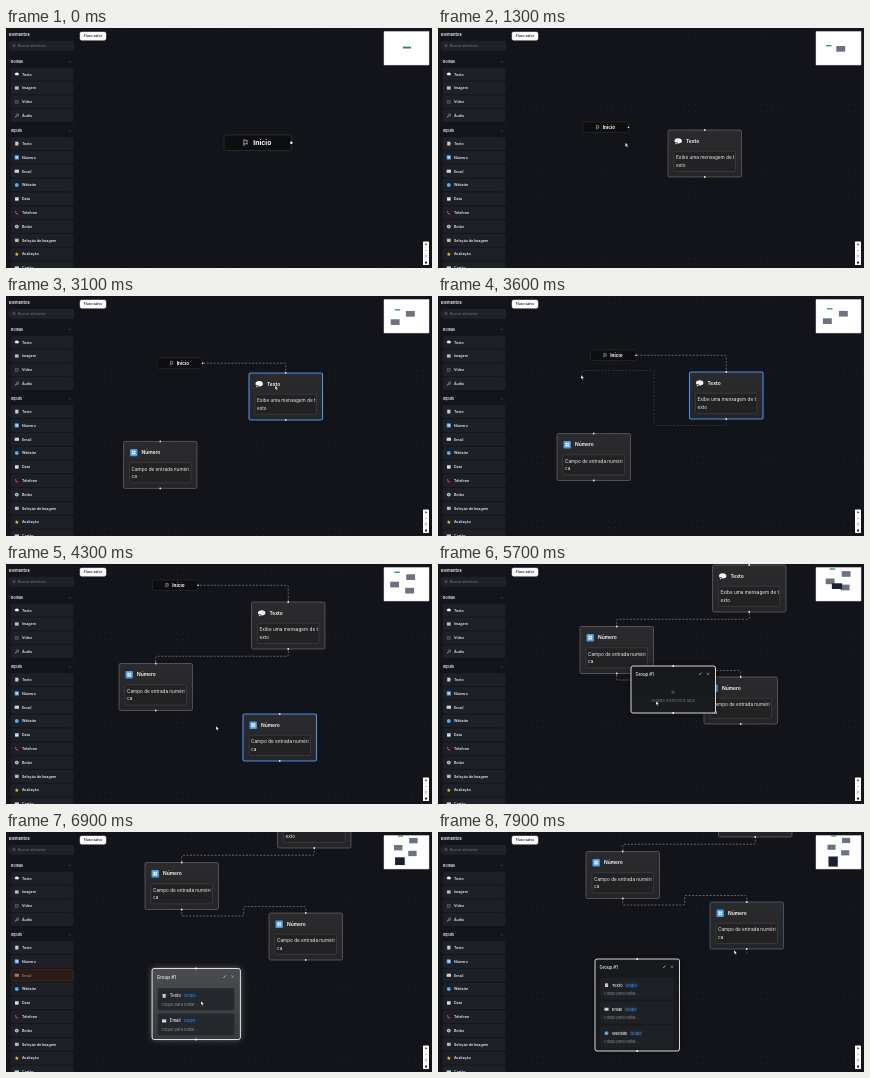
Animation, 426 px wide and 240 px high, one loop 8 s. Source, as an HTML page with a canvas:

```html
<!DOCTYPE html>
<html lang="pt">
<head>
<meta charset="utf-8">
<title>Editor de fluxo</title>
<style>
html, body { margin: 0; width: 100%; height: 100%; overflow: hidden; background: #131419; }
canvas { display: block; width: 426px; height: 240px; }
</style>
</head>
<body>
<canvas id="stage"></canvas>
<script>
const W = 426, H = 240, LOOP = 8000;
const canvas = document.getElementById('stage');
const c = canvas.getContext('2d');
const dpr = window.devicePixelRatio || 1;
canvas.width = W * dpr;
canvas.height = H * dpr;

const FONT = 'Inter, "Open Sans", sans-serif';
const CARD = { w: 73.5, h: 47 };
const START = { w: 45.5, h: 10.5 };

// Each key is [time, ...values]
const viewKeys = [[200, 218, 107, 1.48], [800, 145, 94, 1], [2600, 145, 94, 1], [3300, 152.5, 54, 1],
  [3700, 152.5, 54, 1], [4000, 146.5, 16, 1], [4900, 146.5, 16, 1], [5400, 175.5, -21, 1],
  [5800, 175.5, -21, 1], [6300, 172.5, -53, 1], [7000, 172.5, -53, 1], [7600, 181.5, -64, 1]];
const textKeys = [[2950, 85, 8], [3250, 99, 22]];
const numKeys = [[2650, 18.5, 69], [2950, -33.5, 83.5]];
const groupKeys = [[5750, 17.5, 123], [6200, -24.5, 191]];
const cursorKeys = [[0, 284, 115], [500, 120, 70], [800, 12, 46], [1200, 250, 112], [1500, 12, 130],
  [1800, 185, 173], [2000, 190, 99], [2300, 231, 91], [2600, 266, 102], [2650, 200, 173], [2950, 148, 160],
  [3000, 262, 95], [3250, 285, 85], [3350, 288, 123], [3600, 144, 81], [3800, 152, 118], [3950, 12, 130],
  [4200, 262, 160], [4300, 211, 164], [4400, 149, 146], [4700, 273, 150], [5000, 30, 234], [5300, 215, 125],
  [5700, 219, 139], [5800, 219, 139], [6200, 177, 176], [6300, 20, 116], [6500, 190, 170], [6600, 20, 143],
  [6850, 196, 168], [6900, 196, 171], [7100, 20, 157], [7400, 199, 185], [7750, 309, 118], [7900, 297, 120]];

// start, end, sidebar row
const drags = [[800, 1200, 0], [1500, 1800, 5], [3950, 4200, 5], [6300, 6500, 4], [6600, 6850, 6], [7100, 7400, 7]];

const rows = [['Texto', 'chat'], ['Imagem', 'image'], ['Vídeo', 'video'], ['Áudio', 'audio'],
  ['Texto', 'memo'], ['Número', 'number'], ['Email', 'mail'], ['Website', 'globe'], ['Data', 'date'],
  ['Telefone', 'phone'], ['Botão', 'button'], ['Seleção de Imagem', 'image'], ['Avaliação', 'star'], ['Cartão', 'mail']];
const rowY = i => i < 4 ? 46.2 + i * 13.8 : 115.6 + (i - 4) * 13.82;

function track(keys, t) {
  let i = keys.findIndex(k => k[0] > t);
  if (i === 0) return keys[0].slice(1);
  if (i < 0) return keys[keys.length - 1].slice(1);
  const a = keys[i - 1], b = keys[i];
  let p = (t - a[0]) / (b[0] - a[0]);
  p = p * p * (3 - 2 * p);
  return a.slice(1).map((v, j) => v + (b[j + 1] - v) * p);
}

function box(x, y, w, h, r, fill, stroke, line = 0.6) {
  c.beginPath();
  c.roundRect(x, y, w, h, r);
  if (fill) { c.fillStyle = fill; c.fill(); }
  if (stroke) { c.strokeStyle = stroke; c.lineWidth = line; c.stroke(); }
}

function text(str, x, y, size, color = '#f2f2f4', weight = 400, align = 'left') {
  c.font = `${weight} ${size}px ${FONT}`;
  c.textAlign = align;
  c.fillStyle = color;
  c.fillText(str, x, y);
  return c.measureText(str).width;
}

function dot(x, y, r, color) {
  c.beginPath();
  c.arc(x, y, r, 0, 7);
  c.fillStyle = color;
  c.fill();
}

function line(points, color, width = 0.6) {
  c.beginPath();
  points.forEach(([x, y], i) => i ? c.lineTo(x, y) : c.moveTo(x, y));
  c.strokeStyle = color;
  c.lineWidth = width;
  c.stroke();
}

// Icons are drawn around their centre
function icon(kind, x, y, s) {
  c.save();
  c.translate(x, y);
  c.scale(s, s);
  const r = (a, b, w, h, col) => { c.fillStyle = col; c.fillRect(a, b, w, h); };
  switch (kind) {
    case 'chat':
      c.beginPath();
      c.ellipse(0, -0.05, 0.5, 0.36, 0, 0, 7);
      c.moveTo(-0.35, 0.1); c.lineTo(-0.38, 0.45); c.lineTo(0, 0.25);
      c.fillStyle = '#f1f3f5'; c.fill();
      break;
    case 'image': r(-0.45, -0.4, 0.9, 0.8, '#c9a860'); r(-0.3, -0.25, 0.6, 0.5, '#a8c6d0'); break;
    case 'video': r(-0.4, -0.42, 0.8, 0.84, '#5b626b'); r(-0.22, -0.3, 0.44, 0.6, '#343a43'); break;
    case 'audio': dot(-0.25, 0.25, 0.18, '#7c8ba3'); dot(0.25, 0.12, 0.18, '#7c8ba3');
      line([[-0.1, 0.25], [-0.1, -0.35], [0.4, -0.42], [0.4, 0.1]], '#7c8ba3', 0.14); break;
    case 'memo': r(-0.36, -0.45, 0.72, 0.9, '#e4e5e7');
      r(-0.22, -0.22, 0.44, 0.1, '#888'); r(-0.22, 0.05, 0.44, 0.1, '#888');
      line([[0.05, 0.35], [0.45, -0.1]], '#d99a4a', 0.16); break;
    case 'number': box(-0.5, -0.5, 1, 1, 0.12, '#4b9be6');
      for (const k of [-0.13, 0.13]) {
        line([[k, -0.3], [k, 0.3]], '#fff', 0.1);
        line([[-0.3, k], [0.3, k]], '#fff', 0.1);
      }
      break;
    case 'mail': r(-0.5, -0.36, 1, 0.72, '#e3e6ea'); line([[-0.45, -0.3], [0, 0.1], [0.45, -0.3]], '#7893b2', 0.12); break;
    case 'globe': dot(0, 0, 0.48, '#4d9fe0'); dot(-0.1, 0.05, 0.2, '#83c7f2'); break;
    case 'date': r(-0.42, -0.42, 0.84, 0.84, '#e8ecf0'); r(-0.42, -0.42, 0.84, 0.28, '#7da7d8'); break;
    case 'phone': line([[-0.32, -0.35], [-0.2, 0.1], [0.3, 0.35]], '#d8394c', 0.26); break;
    case 'button': dot(0, 0, 0.45, '#c5c9ce'); dot(0, 0, 0.2, '#686d75'); break;
    case 'star':
      c.beginPath();
      for (let i = 0; i < 10; i++) {
        const a = i * Math.PI / 5 - Math.PI / 2, q = i % 2 ? 0.23 : 0.52;
        c.lineTo(Math.cos(a) * q, Math.sin(a) * q);
      }
      c.fillStyle = '#f2b93b'; c.fill();
      break;
  }
  c.restore();
}

function drawGrid(vx, vy, z) {
  const gap = 5.9 * z;
  const mod = (v, m) => ((v % m) + m) % m;
  const wave = (v, o) => Math.max(0, Math.cos((v - o) / 79 * 2 * Math.PI));
  c.fillStyle = '#41444c';
  for (let x = 70 + mod(vx - 70, gap); x < W; x += gap)
    for (let y = mod(vy, gap); y < H; y += gap) {
      c.globalAlpha = 0.14 + 0.55 * wave(x, 96) * wave(y, 77);
      c.fillRect(x, y, 0.8, 0.8);
    }
  c.globalAlpha = 1;
}

function dashed(points, t, color) {
  c.save();
  c.setLineDash([2, 1.5]);
  c.lineDashOffset = -t * 0.007;
  c.beginPath();
  c.moveTo(...points[0]);
  for (let i = 1; i < points.length - 1; i++) c.arcTo(...points[i], ...points[i + 1], 1.2);
  c.lineTo(...points[points.length - 1]);
  c.strokeStyle = color;
  c.lineWidth = 0.65;
  c.stroke();
  c.restore();
}

function stepPath(sx, sy, tx, ty) {
  if (ty - sy > 12) {
    const my = (sy + ty) / 2;
    return [[sx, sy], [sx, my], [tx, my], [tx, ty]];
  }
  const mx = (sx + tx) / 2;
  return [[sx, sy], [sx, sy + 6.5], [mx, sy + 6.5], [mx, ty - 6.5], [tx, ty - 6.5], [tx, ty]];
}

function drawStart(n, z) {
  c.save();
  c.translate(n.x, n.y);
  c.scale(z, z);
  box(0, 0, START.w, START.h, 1.2, '#0d0e0f', '#34352f', 0.5);
  line([[13.4, 7.5], [13.4, 3.2], [16, 3.9], [15.3, 5], [16, 6], [13.4, 6]], '#d8d8d8', 0.45);
  text('Início', 19.8, 7, 4.6, '#fff', 700);
  dot(START.w, START.h / 2, 0.8, '#fff');
  c.restore();
}

function drawCard(n) {
  const border = n.active ? '#4c91ea' : n.hover ? '#4b6a93' : '#66676a';
  const fill = c.createLinearGradient(0, n.y, 0, n.y + CARD.h);
  fill.addColorStop(0, '#2b2b2d');
  fill.addColorStop(1, '#252527');
  box(n.x, n.y, CARD.w, CARD.h, 1.6, fill, border, n.active ? 1.1 : 0.7);
  icon(n.icon, n.x + 10.2, n.y + 11.2, 7.4);
  text(n.title, n.x + 18, n.y + 12.8, 4.9, '#fff', 600);
  box(n.x + 6, n.y + 21.2, 61.5, 20.2, 1.2, '#222224', '#4a4a4d', 0.5);
  n.lines.forEach((s, i) => text(s, n.x + 8, n.y + 29.4 + i * 7.5, 4.7, '#f0f0f0'));
  dot(n.x + CARD.w / 2, n.y, 0.9, '#e6e6e6');
  dot(n.x + CARD.w / 2, n.y + CARD.h, 0.9, '#e6e6e6');
}

function drawGroup(g, items, over) {
  c.save();
  c.translate(g.x + g.w / 2, g.y + g.h / 2);
  if (over) c.scale(1.045, 1.045);
  c.translate(-g.w / 2, -g.h / 2);
  const fill = c.createLinearGradient(0, 0, 0, g.h);
  fill.addColorStop(0, over ? '#4b4c4f' : '#17181b');
  fill.addColorStop(1, over ? '#38393c' : '#1a1b1f');
  c.save();
  c.shadowColor = over ? 'rgba(255,255,255,.35)' : 'rgba(0,0,0,.6)';
  c.shadowBlur = 6 * dpr;
  box(0, 0, g.w, g.h, 2, fill);
  c.restore();
  box(0, 0, g.w, g.h, 2, null, '#eeeeef', 0.9);
  text('Group #1', 4.5, 9.7, 4.3, '#f4f4f4', 500);
  line([[68.2, 9], [70.6, 6.6]], '#c9c9cc', 0.8);
  line([[76, 6.7], [78, 9]], '#b4b4b8', 0.5);
  line([[78, 6.7], [76, 9]], '#b4b4b8', 0.5);
  if (!items.length) {
    line([[42, 24.2], [42, 28.2]], '#85858c', 0.5);
    line([[40, 26.2], [44, 26.2]], '#85858c', 0.5);
    text('Arraste elementos aqui', 42, 35.6, 4, '#73747b', 400, 'center');
  }
  items.forEach((row, i) => {
    const y = 19 + i * 24, [name, kind] = rows[row];
    box(5.5, y, 73, 21, 1.4, over ? '#24282d' : '#1e2025', over ? '#30353b' : '#25272c', 0.4);
    icon(kind, 11.5, y + 7.2, 4);
    const w = text(name, 17, y + 8.7, 4, '#f0f0f0', 500);
    box(17 + w + 2, y + 4.6, 13, 5.5, 1, '#1c2c3f');
    text('Grupo', 17 + w + 3, y + 8.6, 3.8, '#4e91d9');
    text('Clique para editar...', 9, y + 16.5, 3.8, '#8a8d93');
  });
  dot(g.w / 2, 0, 0.9, '#fff');
  dot(g.w / 2, g.h, 0.9, '#fff');
  c.restore();
}

function drawSidebar(t) {
  c.fillStyle = '#14151a';
  c.fillRect(0, 0, 69.5, H);
  text('Elementos', 3, 8.3, 4.1, '#fff', 600);
  box(3, 13.2, 64.5, 9, 1.5, '#1f2128', '#292c34', 0.4);
  c.beginPath();
  c.arc(8, 17.4, 1.1, 0, 7);
  c.strokeStyle = '#8b8f98'; c.lineWidth = 0.4; c.stroke();
  line([[8.8, 18.2], [9.6, 19]], '#8b8f98', 0.4);
  text('Buscar elemento', 12, 18.9, 3.5, '#777b84');
  [['Bolhas', 33.5], ['Inputs', 103]].forEach(([s, y]) => {
    text(s, 5, y + 1.3, 3.7, '#f0f0f2', 600);
    line([[62.5, y - 0.6], [63.6, y + 0.5], [64.7, y - 0.6]], '#747780', 0.4);
  });
  const held = drags.find(d => t >= d[0] && t <= d[1] + 50);
  rows.forEach(([name, kind], i) => {
    const y = rowY(i), on = held && held[2] === i;
    box(5, y - 6, 62, 12, 1.6, on ? '#2a1b17' : '#1e2027', on ? '#5c3018' : '#23262d', 0.5);
    c.globalAlpha = on ? 0.5 : 1;
    icon(kind, 10.8, y, 4.2);
    text(name, 16, y + 1.3, 3.6, '#e9eaee', 600);
    c.globalAlpha = 1;
  });
}

function drawPanels(boxes) {
  box(74, 4, 26, 8.2, 1.6, '#fff', '#ded5ee', 0.5);
  text('Fluxo salvo', 87, 9.4, 3.4, '#2a2635', 600, 'center');

  box(378, 3.5, 45, 33.5, 0, '#fff', '#e4dcf0', 0.5);
  let x0 = 70, y0 = 0, x1 = W, y1 = H;
  for (const b of boxes) {
    x0 = Math.min(x0, b.x); y0 = Math.min(y0, b.y);
    x1 = Math.max(x1, b.x + b.w); y1 = Math.max(y1, b.y + b.h);
  }
  const k = Math.min(43 / (x1 - x0), 33.5 / (y1 - y0));
  const mx = v => 400.5 + (v - (x0 + x1) / 2) * k, my = v => 20.2 + (v - (y0 + y1) / 2) * k;
  for (const b of boxes) {
    c.fillStyle = b.map;
    c.fillRect(mx(b.x), my(b.y), b.w * k, b.h * k);
  }

  box(417, 213.5, 6, 23.5, 0.6, '#fff');
  for (let i = 1; i < 4; i++) line([[417, 213.5 + i * 5.9], [423, 213.5 + i * 5.9]], '#ddd', 0.4);
  line([[418.9, 216.4], [421.1, 216.4]], '#222', 0.6);
  line([[420, 215.3], [420, 217.5]], '#222', 0.6);
  line([[418.9, 222.3], [421.1, 222.3]], '#777', 0.5);
  box(419, 227.2, 2, 2, 0, null, '#777', 0.4);
  box(419, 233.6, 2, 1.8, 0.2, '#222');
}

function drawCursor(x, y) {
  c.beginPath();
  [[0, 0], [0, 4.2], [1, 3.3], [1.7, 4.8], [2.4, 4.5], [1.7, 3], [3, 2.9]].forEach(p => c.lineTo(x - 1 + p[0], y - 2 + p[1]));
  c.closePath();
  c.fillStyle = '#fff'; c.fill();
  c.strokeStyle = '#111'; c.lineWidth = 0.3; c.stroke();
}

function draw(t) {
  const [vx, vy, z] = track(viewKeys, t);
  const [cx, cy] = track(cursorKeys, t);
  const place = ([x, y]) => ({ x: vx + x, y: vy + y, w: CARD.w, h: CARD.h, map: '#6d7180' });
  const start = { x: vx, y: vy, w: START.w * z, h: START.h * z, map: '#2f8f4a' };
  const number = { icon: 'number', title: 'Número', lines: ['Campo de entrada numéri', 'ca'] };
  const a = { ...place(track(textKeys, t)), icon: 'chat', title: 'Texto', born: 1200,
    lines: ['Exibe uma mensagem de t', 'exto'], active: t >= 2950 && t < 3900 };
  const b = { ...place(track(numKeys, t)), ...number, born: 1800, active: t >= 2650 && t < 2950 };
  const d = { ...place([90.5, 134]), ...number, born: 4200, active: t >= 4200 && t < 4700, hover: t >= 7700 };
  const cards = [a, b, d].filter(n => t >= n.born);
  const items = drags.slice(3).filter(k => t >= k[1]).map(k => k[2]);
  const g = { ...place(track(groupKeys, t)), w: 84.5, map: '#1b2030',
    h: items.length ? 20 + 24 * items.length : 47 };
  const hasGroup = t >= 5300;

  c.setTransform(dpr, 0, 0, dpr, 0, 0);
  c.fillStyle = '#131419';
  c.fillRect(0, 0, W, H);
  drawGrid(vx, vy, z);

  const out = n => [n.x + CARD.w / 2, n.y + CARD.h], into = n => [n.x + CARD.w / 2, n.y];
  const sx = start.x + start.w, sy = start.y + start.h / 2;
  const gray = '#88898c', dim = '#696a6e';
  if (t >= 2600) dashed([[sx, sy], [into(a)[0], sy], into(a)], t, gray);
  else if (t >= 2000) dashed([[sx, sy], [sx + 14, sy], [sx + 14, cy + 2], [cx, cy + 2]], t, dim);
  if (t >= 3800) dashed(stepPath(...out(a), ...into(b)), t, gray);
  else if (t >= 3400) dashed(stepPath(...out(a), cx, cy), t, '#404146');
  if (t >= 4700) dashed(stepPath(...out(b), ...into(d)), t, gray);
  else if (t >= 4400) dashed(stepPath(...out(b), cx, cy), t, dim);
  if (t >= 7800) dashed([out(d), [out(d)[0], out(d)[1] + 5]], t, dim);

  drawStart(start, z);
  cards.forEach(drawCard);
  const over = drags.slice(3).some(k => t >= k[1] - 100 && t <= k[1] + 50);
  if (hasGroup) drawGroup(g, items, over);
  drawSidebar(t);
  drawPanels([start, ...cards, ...(hasGroup ? [g] : [])]);

  const held = drags.find(k => t > k[0] && t < k[1]);
  if (held) {
    c.globalAlpha = 0.6;
    box(cx - 8, cy - 6, 62, 12, 1.6, '#1e2027', '#30343c', 0.5);
    icon(rows[held[2]][1], cx - 2.2, cy, 4.2);
    text(rows[held[2]][0], cx + 3, cy + 1.3, 3.6, '#e9eaee', 600);
    c.globalAlpha = 1;
  }
  if (t >= 100) drawCursor(cx, cy);
}

function frame(now) {
  draw(Math.floor(now % LOOP / 100) * 100);
  requestAnimationFrame(frame);
}
requestAnimationFrame(frame);
</script>
</body>
</html>
```
